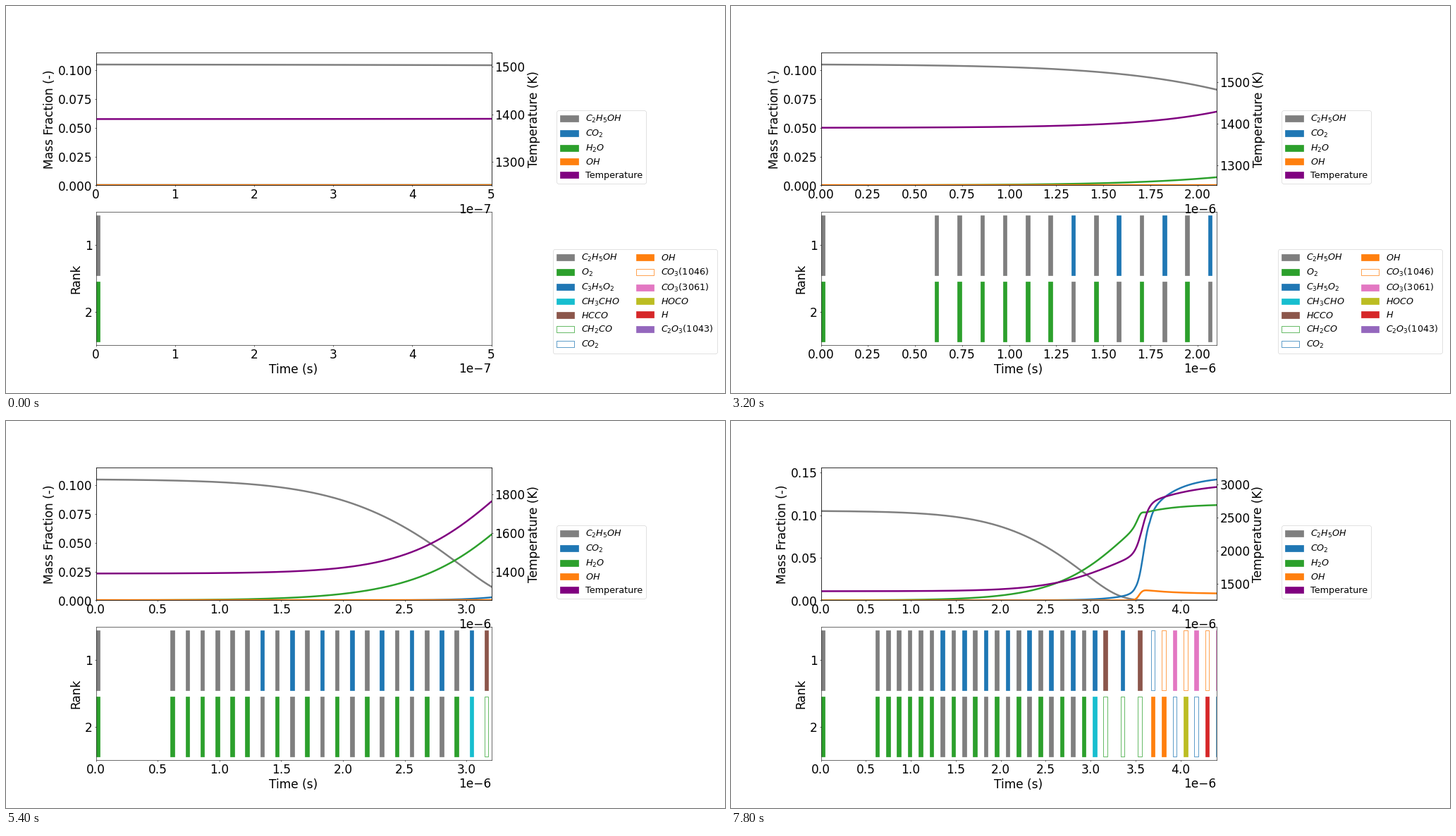
Write a matplotlib script that moves like this. It is 1020 px wide and 549 px high and loops after 8000 ms.

```python
import numpy as np
import matplotlib.pyplot as plt
from matplotlib.animation import FuncAnimation
from matplotlib.patches import Patch, Rectangle

W, H, DPI = 1020, 549, 51
STEPS, INTERVAL = 40, 200
US = 1e-6
GRAY, BLUE, GREEN, ORANGE = "tab:gray", "tab:blue", "tab:green", "tab:orange"

plt.rcParams.update({"font.family": "DejaVu Sans", "font.size": 24,
                     "mathtext.fontset": "dejavusans"})


def sigmoid(x):
    return 1 / (1 + np.exp(-np.clip(x, -60, 60)))


def settle(t, start, tau):
    """Relax from 0 to 1 after the start time."""
    return 1 - np.exp(-np.maximum(t - start, 0) / tau)


# Slow induction, then ignition near 3.57 microseconds.
t = np.arange(441) / 100
fuel = .1053 * sigmoid(5.8 - 2.12 * t - np.exp(3.6 * (t - 3.18)))
co2 = (.0058 * np.exp(3.9 * (np.minimum(t, 3.5) - 3.4))
       + .095 * sigmoid((t - 3.59) / .035) + .042 * settle(t, 3.66, .3))
h2o = (.1035 * sigmoid(2.2 * t - 7.25 + np.exp(2.9 * (t - 3.5)) + np.exp(30 * (t - 3.53)))
       + .0095 * settle(t, 3.62, .35))
oh = sigmoid((t - 3.54) / .02) * (.0123 - .0045 * settle(t, 3.6, .35))
temp = 1390 + 900 * sigmoid(2.5 * (t - 3.34)) + 735 * sigmoid((t - 3.575) / .04)
species = [(fuel, GRAY), (co2, BLUE), (h2o, GREEN), (oh, ORANGE)]

fig = plt.figure(figsize=(20, 10.765), dpi=DPI, facecolor="white")


def panel(top):
    height = 188.6
    return fig.add_axes([.125, 1 - (top + height) / H, .55, height / H],
                        facecolor="none")


top_ax, rank_ax = panel(65.9), panel(292.3)
temp_ax = top_ax.twinx()
top_ax.set_ylabel("Mass Fraction (-)")
temp_ax.set_ylabel("Temperature (K)")
rank_ax.set(xlabel="Time (s)", ylabel="Rank", ylim=(2.5, .5), yticks=[1, 2])

curves = [(top_ax.plot([], [], color=c, lw=3.5)[0], y) for y, c in species]
curves += [(temp_ax.plot([], [], color="purple", lw=3.5)[0], temp)]


def style(color, filled=True):
    return dict(facecolor=color if filled else "white", edgecolor=color, lw=1)


KINDS = {
    "fuel": ("$C_2H_5OH$", style(GRAY)),
    "o2": ("$O_2$", style(GREEN)),
    "c3": ("$C_3H_5O_2$", style(BLUE)),
    "acet": ("$CH_3CHO$", style("tab:cyan")),
    "hcco": ("$HCCO$", style("tab:brown")),
    "ket": ("$CH_2CO$", style(GREEN, False)),
    "co2": ("$CO_2$", style(BLUE, False)),
    "oh": ("$OH$", style(ORANGE)),
    "co3a": ("$CO_3(1046)$", style(ORANGE, False)),
    "co3b": ("$CO_3(3061)$", style("tab:pink")),
    "hoco": ("$HOCO$", style("tab:olive")),
    "h": ("$H$", style("tab:red")),
    "c2o3": ("$C_2O_3(1043)$", style("tab:purple")),
}

GAP = .121
starts = np.concatenate([[0], .604 + GAP * np.arange(22), [3.334, 3.528],
                         3.672 + GAP * np.arange(7)])
pairs = 7 * ["fuel o2"] + 7 * ["c3 fuel", "fuel o2"]
pairs += ["c3 acet", "hcco ket", "c3 ket", "hcco ket", "co2 oh", "co3a oh",
          "co3b co2", "co3a hoco", "co3b co2", "co3a h", "co3b co2"]

bars = []
for start, pair in zip(starts, pairs):
    for rank, kind in enumerate(pair.split(), 1):
        bar = Rectangle((start * US, rank - .45), 0, .9, **KINDS[kind][1])
        bars.append(rank_ax.add_patch(bar))


def legend(items, x, y, cols=1):
    handles = [Patch(label=label, **look) for label, look in items]
    return fig.legend(handles=handles, loc="center left", ncol=cols, fontsize=18,
                      bbox_to_anchor=(x / W, 1 - y / H), borderaxespad=0,
                      labelspacing=.44, columnspacing=1.8)


legend([KINDS["fuel"], ("$CO_2$", style(BLUE)), ("$H_2O$", style(GREEN)),
        KINDS["oh"], ("Temperature", style("purple"))], 781, 200)
rank_legend = legend(KINDS.values(), 775.5, 419, cols=2)
LEGEND_SPANS = ((0, 2), (5, 10), (15, 21))


def draw(i):
    end = (5 + i) * 1e-7
    n = 51 + 10 * i
    for line, y in curves:
        line.set_data(t[:n] * US, y[:n])
    for bar in bars:
        bar.set_width(.01 * end)
    for ax in (top_ax, rank_ax):
        ax.set_xlim(0, end)
    top_ax.set_ylim(0, 1.1 * max(y[:n].max() for y, _ in species))
    temp_ax.set_ylim(.9 * temp[0], 1.1 * temp[:n].max())
    rank_legend.set_visible(any(a <= i <= b for a, b in LEGEND_SPANS))
    return []


anim = FuncAnimation(fig, draw, frames=STEPS, interval=INTERVAL,
                     repeat=True, repeat_delay=0, blit=False)
plt.show()
```
